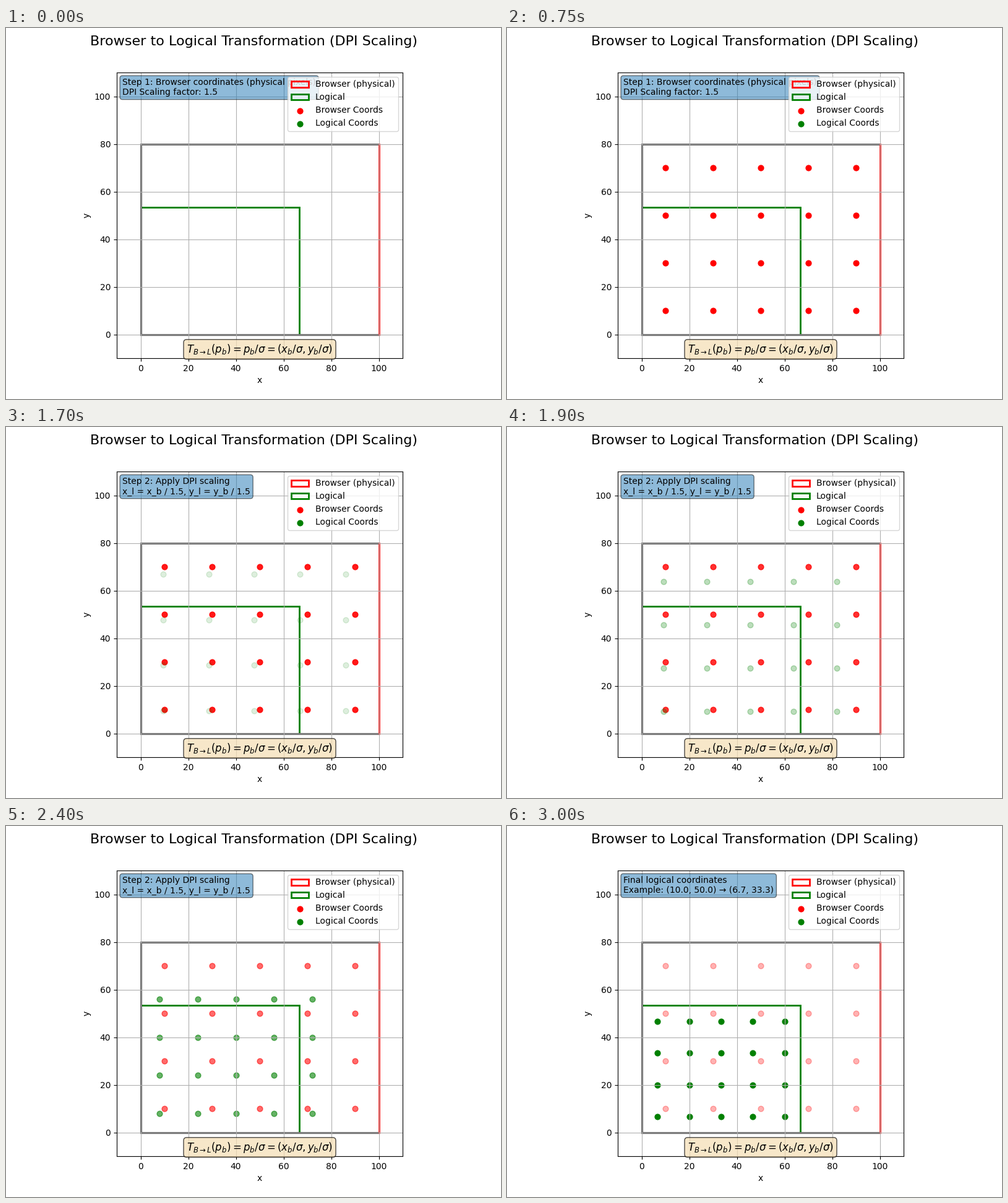
Recreate the animation shown at these times as a matplotlib script. Size 800 by 600 pixels, loop 4500 ms.

```python
import numpy as np
import matplotlib.pyplot as plt
from matplotlib.animation import FuncAnimation
from matplotlib.patches import Rectangle

FRAMES, INTERVAL = 90, 50
FADE_IN = 15            # frames until the browser points are opaque
MOVE, DONE = 30, 60     # start and end of the scaling step
SCALE = 1.5
W, H = 100, 80
EPS = 0.05              # keeps border lines on one side of pixel rounding

fig, ax = plt.subplots(figsize=(8, 6), dpi=100)
fig.suptitle("Browser to Logical Transformation (DPI Scaling)", fontsize=16)

xs, ys = np.meshgrid(np.arange(10, W, 20), np.arange(10, H, 20))
browser = np.column_stack([xs.ravel(), ys.ravel()]).astype(float)
logical = browser / SCALE


def border(x, y, color, lw=2.0, cap="butt"):
    ax.plot(x, y, color=color, lw=lw, zorder=1,
            solid_capstyle=cap, solid_joinstyle="miter")


def key(color, label):
    return Rectangle((0, 0), 1, 1, fill=False, ec=color, lw=2, label=label)


left, right, top, bottom = EPS, W + EPS, H - EPS, -EPS
lw_, lh = W / SCALE, H / SCALE
border([left, lw_, lw_], [lh, lh, bottom], "green")
border([right, left, left, right], [top, top, bottom, bottom], "#505050", 2.16)
border([right, right], [bottom, top], "red", cap="projecting")

red = ax.scatter(*browser.T, s=40, c="red", label="Browser Coords")
green = ax.scatter(*browser.T, s=40, c="green", label="Logical Coords")

ax.set(xlim=(-10, 110), ylim=(-10, 110), xlabel="x", ylabel="y")
ax.set_aspect("equal")
ax.grid(True)
ax.legend(handles=[key("red", "Browser (physical)"), key("green", "Logical"),
                   red, green], loc="upper right")

note = ax.text(0.02, 0.98, "", transform=ax.transAxes, va="top",
               bbox=dict(boxstyle="round", alpha=0.5))
ax.text(0.5, 0.02,
        r"$T_{B \rightarrow L}(p_b) = p_b / \sigma = (x_b/\sigma, y_b/\sigma)$",
        transform=ax.transAxes, ha="center", fontsize=12,
        bbox=dict(boxstyle="round", facecolor="wheat", alpha=0.7))

STEP_1 = ("Step 1: Browser coordinates (physical pixels)\n"
          f"DPI Scaling factor: {SCALE}")
STEP_2 = f"Step 2: Apply DPI scaling\nx_l = x_b / {SCALE}, y_l = y_b / {SCALE}"
FINAL = ("Final logical coordinates\n"
         "Example: (10.0, 50.0) → (6.7, 33.3)")


def update(i):
    p = float(np.clip((i - MOVE) / (DONE - MOVE), 0, 1))
    if i < MOVE:
        note.set_text(STEP_1)
        red.set_alpha(min(i / FADE_IN, 1))
    else:
        note.set_text(STEP_2 if i < DONE else FINAL)
        red.set_alpha(1 - 0.7 * p)
    green.set_offsets(browser + (logical - browser) * p)
    green.set_alpha(p)
    return red, green, note


anim = FuncAnimation(fig, update, frames=FRAMES, interval=INTERVAL,
                     init_func=lambda: update(0), repeat=True, repeat_delay=0)
plt.show()
```
